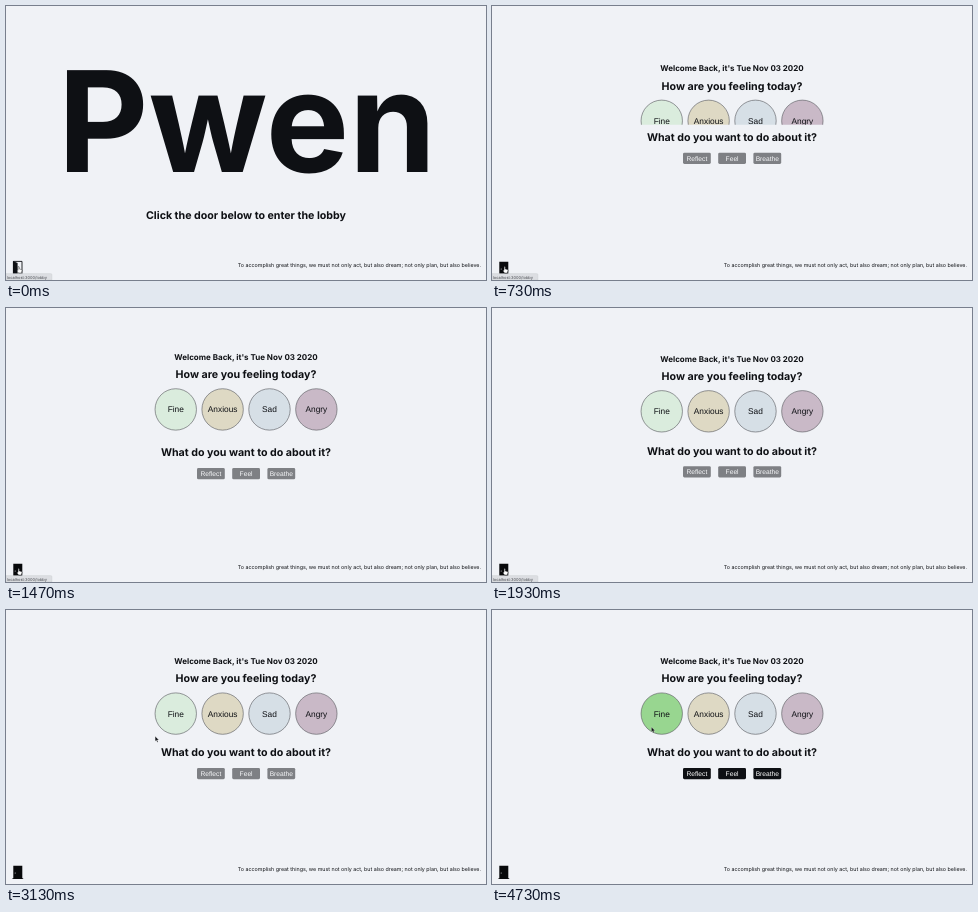
Recreate the animation shown at these times as an HTML page. Size 480x274 px, loop 5.59 s.

```html
<!DOCTYPE html>
<html lang="en">
<head>
<meta charset="utf-8">
<title>Lobby</title>
<style>
  html, body { margin: 0; width: 100%; height: 100%; overflow: hidden; background: #f0f2f6; }
  svg { display: block; width: 100%; height: 100%; }
  text { font-family: Inter, sans-serif; fill: #0e1014; text-anchor: middle; text-rendering: geometricPrecision; }
  .name { font-size: 140px; font-weight: 700; }
  .head { font-size: 10.667px; font-weight: 700; }
  .date { font-size: 8px; font-weight: 700; }
  .quote { font-size: 5.333px; text-anchor: end; }
  .url { font-size: 4px; fill: #44474c; text-anchor: start; }
  .mood text { font: 8.33px "Liberation Sans", Arial, sans-serif; }
  .mood circle { stroke: #55575b; stroke-width: .6; }
  .act text { font: 6.667px "Liberation Sans", Arial, sans-serif; fill: #fff; }
  .act rect { fill: #0e1014; }
</style>
</head>
<body>
<svg viewBox="0 0 480 274">
  <defs>
    <clipPath id="clip"><rect id="window" x="140" y="78" width="200" height="52"/></clipPath>
  </defs>

  <g id="home">
    <text class="name" x="241" y="165.7">Pwen</text>
    <text class="head" x="240" y="212.7">Click the door below to enter the lobby</text>
    <path d="M7.4 255.4H16V268H7.4Z" fill="#f0f2f6" stroke="#0e1014" stroke-width=".9"/>
    <path d="M7 255L11.6 257V269.4L7 268.4Z" fill="#0e1014"/>
  </g>

  <g id="lobby">
    <g id="top">
      <text class="date" x="240" y="54">Welcome Back, it's Tue Nov 03 2020</text>
      <text class="head" x="240" y="72.4">How are you feeling today?</text>
    </g>
    <g clip-path="url(#clip)"><g id="moods"></g></g>
    <g id="bottom">
      <text class="head" x="240" y="146.3">What do you want to do about it?</text>
      <g id="acts"></g>
    </g>
    <path d="M7.3 255.8H16.3V268.2H17.2V269H6.4V268.2H7.3Z" fill="#08090b"/>
    <circle cx="9.2" cy="263" r=".5" fill="#d8dade"/>
  </g>

  <text class="quote" x="475" y="260.6">To accomplish great things, we must not only act, but also dream; not only plan, but also believe.</text>

  <g id="status">
    <path d="M0 267.6H44.6Q46 267.6 46 269V274H0Z" fill="#dcdee2" stroke="#c3c5c9" stroke-width=".3"/>
    <text class="url" x=".8" y="272.7">localhost:3000/lobby</text>
  </g>

  <path id="hand" d="M12.2 260.6Q13 260.2 13.3 261V263L15.4 263.5Q16.1 263.8 16 264.6L15.3 267H12.6L10.8 264.7Q10.9 263.9 12 264.4Z"
    fill="#fff" stroke="#0e1014" stroke-width=".4"/>
  <path id="arrow" d="M0 0V5L1.2 4L2.1 6L3 5.6L2.1 3.7H3.7Z" fill="#0e1014" stroke="#fff" stroke-width=".3"/>
</svg>

<script>
const LOOP = 5590, TICK = 1000 / 15, ENTER = 600;
const $ = id => document.getElementById(id);
const clamp = v => Math.min(1, Math.max(0, v));
const span = (t, a, b) => clamp((t - a) / (b - a));
const mix = (a, b, p) => a + (b - a) * p;
const show = (id, on) => $(id).setAttribute('visibility', on ? 'visible' : 'hidden');
const move = (id, x, y) => $(id).setAttribute('transform', `translate(${x} ${y})`);

const moods = [['Fine', '#98d690'], ['Anxious', '#ded9c4'], ['Sad', '#d6dfe6'], ['Angry', '#c9b9c7']];
$('moods').innerHTML = moods.map(([label, color], i) => {
  const x = 169.75 + 46.87 * i;
  return `<g class="mood"><circle cx="${x}" cy="103.6" r="20.7" fill="${color}"/><text x="${x}" y="106.5">${label}</text></g>`;
}).join('');
$('acts').innerHTML = ['Reflect', 'Feel', 'Breathe'].map((label, i) => {
  const x = 204.9 + 35.2 * i;
  return `<g class="act"><rect x="${x - 13.9}" y="157.9" width="27.8" height="11.3" rx="1.4"/><text x="${x}" y="165.9">${label}</text></g>`;
}).join('');
const fine = document.querySelector('.mood circle');

// Half of the height still missing from the springy mood row
function gap(t) {
  const s = (t - ENTER) / 1000;
  return s < 0 || s > 1.4 ? 0 : 16.8 * Math.exp(-2.3 * s) * Math.cos(3.25 * s);
}

function pointer(t) {
  if (t < 2850) {
    const p = span(t, 2130, 2735), e = p * p * (3 - 2 * p);
    return [mix(13, 97, e), mix(261, 173.5, e)];
  }
  const e = 1 - (1 - span(t, 2867, 3600)) ** 4;
  return [mix(97, 159.4, e), mix(173.5, 117, e)];
}

function draw(now) {
  const t = Math.floor((now % LOOP + 10) / TICK) * TICK;
  const inside = t >= ENTER - 1;
  show('home', !inside);
  show('lobby', inside);

  const y = gap(t);
  move('top', 0, y);
  move('moods', 0, y);
  move('bottom', 0, -y);
  $('window').setAttribute('y', 78 + y);
  $('window').setAttribute('height', 52 - 2 * y);

  const [px, py] = pointer(t);
  const away = px > 17 || py < 254;
  show('hand', !away);
  show('arrow', away);
  move('hand', px - 13, py - 261);
  move('arrow', px, py);
  show('status', t < 2460);

  const picked = span(t, 3933, 4133);
  fine.setAttribute('fill-opacity', mix(.25, 1, picked));
  $('acts').setAttribute('opacity', mix(.5, 1, picked));
}

let start;
function frame(now) {
  start ??= now;
  draw(now - start);
  requestAnimationFrame(frame);
}
draw(0);
requestAnimationFrame(frame);
</script>
</body>
</html>
```
